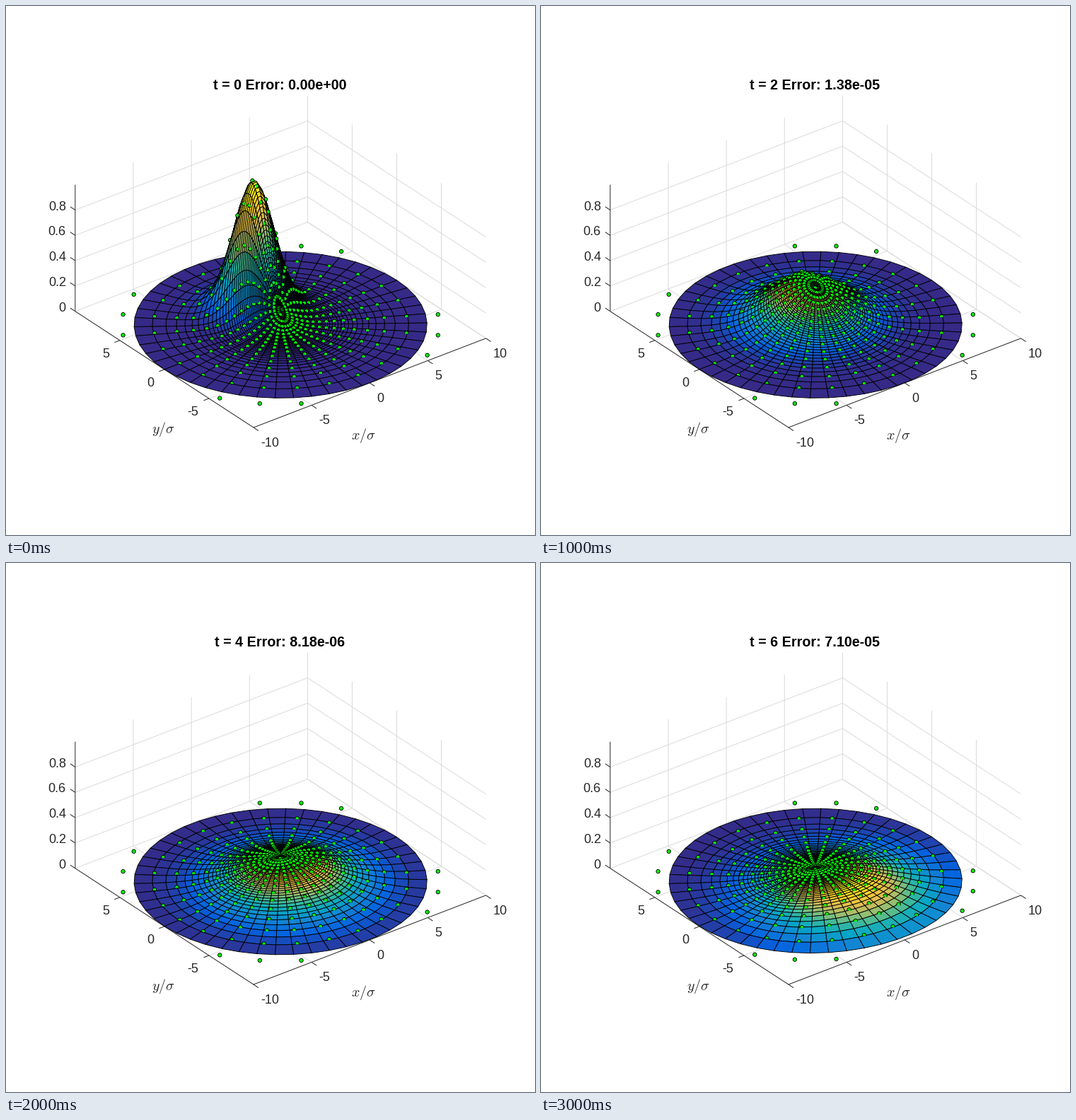
Write a matplotlib script that moves like this. It is 748 px wide and 748 px high and loops after 3.1 s.

```python
import numpy as np
import matplotlib.pyplot as plt
from matplotlib.animation import FuncAnimation
from matplotlib.collections import LineCollection, PolyCollection
from matplotlib.colors import LinearSegmentedColormap

SIZE, DPI = 748, 100
PX = 72 / DPI                      # points per pixel
FRAMES, INTERVAL, DT = 31, 100, 0.2

# Orthographic view: azimuth -37.5 deg, elevation 30 deg
CX, CY = 388.2, 450.8
UNIT, ZUNIT = 20.71, 179           # pixels per x/y unit, and per unit of height
AZ = np.radians(37.5)
COS, SIN = np.cos(AZ), np.sin(AZ)
SIN_EL, COS_EL = 0.5, np.sqrt(0.75)
SLOPE = ZUNIT / COS_EL / UNIT

INK, GRID, GREEN = (0.15,) * 3, (0.86,) * 3, (0, 1, 0, 1)
DOT_R = 2.7
RADIUS = 10                        # edge of the drawn disc
MAP = 4                            # length scale of the rational radial grid

cmap = LinearSegmentedColormap.from_list("surface", [
    "#352a87", "#0363e1", "#1485d4", "#06a7c6", "#38b99e",
    "#92bf73", "#d9ba56", "#fcce2e", "#f9fb0e"])


def turn(x, y):
    """Data coordinates to (rightward, backward) ground coordinates."""
    return x * COS - y * SIN, x * SIN + y * COS


def to_screen(p, q, z):
    return np.stack([CX + UNIT * p, CY - UNIT * SIN_EL * q - ZUNIT * z], -1)


def project(x, y, z=0.0):
    return to_screen(*turn(x, y), z)


def pulse(p, q, t):
    """Gaussian that drifts in -y and diffuses; also its screen slopes."""
    p0, q0 = turn(0, 3 - t)
    w = 4 * (1 + t)
    u = np.exp(-((p - p0) ** 2 + (q - q0) ** 2) / w) / (1 + t)
    k = -2 * SLOPE * u / w
    return u, k * (p - p0), k * (q - q0)


# Surface mesh: uniform in the mapped radius s, dense around the centre
s = np.linspace(0, RADIUS / np.hypot(RADIUS, MAP), 50)
mesh_r, mesh_a = np.meshgrid(MAP * s / np.sqrt(1 - s ** 2),
                             np.linspace(0, 2 * np.pi, 51), indexing="ij")
MP, MQ = turn(mesh_r * np.cos(mesh_a), mesh_r * np.sin(mesh_a))


def corners(a):
    """The four corner values of every mesh cell, closed to a ring."""
    ring = [a[:-1, :-1], a[1:, :-1], a[1:, 1:], a[:-1, 1:], a[:-1, :-1]]
    return np.stack([c.reshape(-1, *a.shape[2:]) for c in ring], 1)


CELL_Q = corners(MQ)[:, :4].mean(1)

# Collocation points (rational Chebyshev radii) inside the axes box
node_r = MAP / np.tan((np.arange(4, 20) + 0.5) * np.pi / 40)
node_a = np.radians(15 * np.arange(24))
DR, DA = (g.ravel() for g in np.meshgrid(node_r, node_a))
DX, DY = DR * np.cos(DA), DR * np.sin(DA)
inside = np.maximum(abs(DX), abs(DY)) < RADIUS
DR, DX, DY = DR[inside], DX[inside], DY[inside]
DP, DQ = turn(DX, DY)


def dot_shapes(t):
    """Outlines of the markers, cut where they dip under the surface."""
    u, hp, hq = pulse(DP, DQ, t)
    facing = SIN_EL + COS_EL * hq
    front = facing > 0.02
    b = (SIN_EL * hq - COS_EL) / np.where(front, facing, 1)
    a = SIN_EL * hp - COS_EL * hp * b
    mid = np.arctan2(-b, -a)
    half = np.where(front & (DR < RADIUS), np.arccos(-1 / DOT_R), np.pi)
    arc = mid[:, None] + half[:, None] * np.linspace(-1, 1, 19)
    ring = DOT_R * np.stack([np.cos(arc), -np.sin(arc)], -1)
    depth = DQ - np.where(front, 0.05 + 0.08 * DR, 0)
    return to_screen(DP, DQ, u)[:, None] + ring, depth


def scene(t):
    """All polygons from back to front, with their colours."""
    z = pulse(MP, MQ, t)[0]
    cells = corners(to_screen(MP, MQ, z))
    shade = z[:-1, :-1].ravel()
    colors = cmap((shade - z.min()) / (z.max() - z.min()))
    dots, dot_q = dot_shapes(t)
    order = np.argsort(-np.concatenate([CELL_Q, dot_q]), kind="stable")
    verts = list(cells) + list(dots)
    colors = np.vstack([colors, np.tile(GREEN, (len(dots), 1))])
    return [verts[i] for i in order], colors[order]


def error(t):
    """Solver error, eased on a log scale between a few key times."""
    times = [0, 1.2, 2.6, 3.4, 4, 4.8, 6]
    values = [3.3e-5, 2.46e-5, 8.98e-6, 6.29e-6, 8.18e-6, 1.54e-5, 7.1e-5]
    return 10 ** np.interp(t, times, np.log10(values)) if t else 0.0


plt.rcParams["font.family"] = "Liberation Sans"
plt.rcParams["mathtext.fontset"] = "cm"
fig = plt.figure(figsize=(SIZE / DPI, SIZE / DPI), dpi=DPI, facecolor="white")
ax = fig.add_axes([0, 0, 1, 1])
ax.set_xlim(0, SIZE)
ax.set_ylim(SIZE, 0)
ax.axis("off")


def add_lines(segments, color, width, zorder):
    ax.add_collection(LineCollection(segments, colors=[color], snap=False,
                                     linewidths=width * PX, zorder=zorder))


def label(x, y, text, ha, size=18, color=INK, va="baseline", **kw):
    return ax.text(x, y, text, ha=ha, va=va, color=color,
                   fontsize=size * PX, zorder=5, **kw)


def segment(a, b):
    return [project(*a), project(*b)]


# Grid on the floor and the two back walls
R = RADIUS
X_TICKS, Y_TICKS = range(-R, R + 1, 5), range(-5, 6, 5)
Z_TICKS = np.arange(5) / 5
grid = []
for x in X_TICKS[1:]:
    grid += [segment((x, -R), (x, R)), segment((x, R, 0), (x, R, 1))]
for y in Y_TICKS:
    grid += [segment((-R, y), (R, y)), segment((R, y, 0), (R, y, 1))]
for z in Z_TICKS:
    grid += [segment((-R, R, z), (R, R, z)), segment((R, R, z), (R, -R, z))]
add_lines(grid, GRID, 1, 1)

# Axis lines, ticks and tick labels
axis_lines = [segment((-R, -R), (R, -R)), segment((-R, -R), (-R, R)),
              segment((-R, R, 0), (-R, R, 1))]


def tick(at, shift, offset, text, ha):
    axis_lines.append([at, at + shift])
    label(*(at + offset), text, ha)


for x in X_TICKS:
    tick(project(x, -R), (7, 4.6), (10, 26.7), str(x), "left")
for y in Y_TICKS:
    tick(project(-R, y), (-7.5, 2.9), (-14.4, 24.2), str(y), "right")
for z in Z_TICKS:
    tick(project(-R, R, z), (-7, -4.6), (-13, 0.2), f"{z:g}", "right")
add_lines(axis_lines, INK, 1, 2)

label(505.5, 608, r"$x/\sigma$", "center", 20, va="center")
label(222.3, 598.6, r"$y/\sigma$", "center", 20, va="center")
title = label(387.5, 118, "", "center", 19.8, "black", weight="bold")

surface = PolyCollection([], closed=False, edgecolors="black",
                         linewidths=0.9 * PX, zorder=3, snap=False)
surface.set_joinstyle("round")
ax.add_collection(surface, autolim=False)


def update(i):
    t = round(DT * i, 1)
    verts, colors = scene(t)
    surface.set_verts(verts, closed=False)
    surface.set_facecolor(colors)
    title.set_text(f"t = {t:g} Error: {error(t):.2e}")
    return surface, title


anim = FuncAnimation(fig, update, frames=FRAMES, interval=INTERVAL,
                     init_func=lambda: update(0), repeat=True, repeat_delay=0)
plt.show()
```
